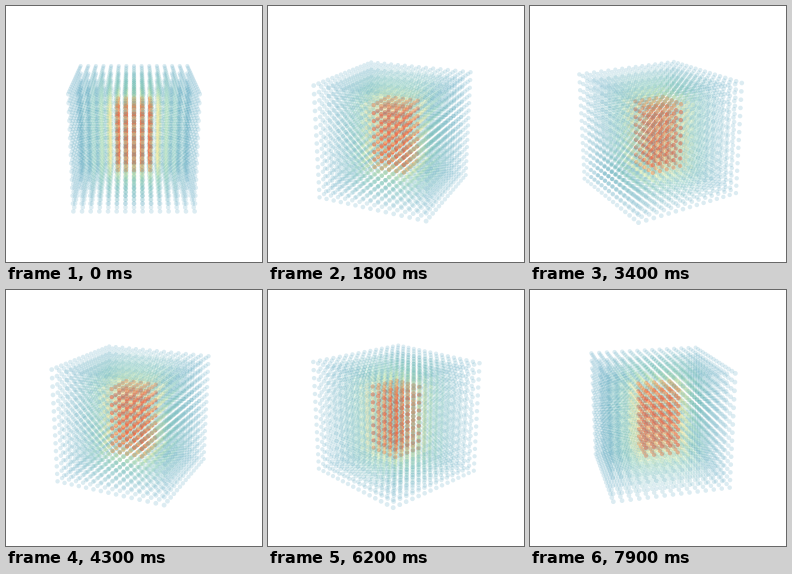
Animation of 256x256 px, one loop 8000 ms. Source, as a matplotlib script:

```python
import numpy as np
import matplotlib.pyplot as plt
from matplotlib.animation import FuncAnimation

SIZE, DPI = 256, 100
FRAMES, INTERVAL = 80, 100
STEP = np.radians(3.6)           # turn per frame
DIST, FOCAL = 9.5, 539           # camera distance and scale in pixels
SIN_E, COS_E = 1 / 3, np.sqrt(8) / 3
PX = 72 / DPI                    # points per pixel

# Cubic lattice with a hot core
axis = np.linspace(-1, 1, 15)
x, y, z = (a.ravel() for a in np.meshgrid(axis, axis, axis))
core = [(x, 0.29), (y, 0.29), (z, 0.51)]
gap = np.sqrt(sum(np.maximum(np.abs(a) - half, 0) ** 2 for a, half in core))
heat = np.exp(-(gap / 0.19) ** 2)
glow = np.exp(-(gap / 0.45) ** 2)
colors = plt.get_cmap("Spectral_r")(0.125 + 0.54 * heat + 0.14 * glow)
colors[:, 3] = 0.18 + 0.47 * heat ** 1.5


def project(angle):
    """Return screen x, screen y and perspective scale of every point."""
    side = x * np.cos(angle) + y * np.sin(angle)
    near = y * np.cos(angle) - x * np.sin(angle)
    scale = FOCAL / (DIST - near * COS_E - z * SIN_E)
    height = z * COS_E - near * SIN_E
    return SIZE / 2 + side * scale, SIZE / 2 + height * scale, scale


fig = plt.figure(figsize=(SIZE / DPI, SIZE / DPI), dpi=DPI, facecolor="white")
ax = fig.add_axes([0, 0, 1, 1])
ax.set(xlim=(0, SIZE), ylim=(0, SIZE))
ax.axis("off")
dots = ax.scatter(x, y, s=8, c=colors, linewidths=0)


def update(frame):
    sx, sy, scale = project(frame * STEP)
    order = np.argsort(scale)
    dots.set_offsets(np.column_stack([sx, sy])[order])
    dots.set_sizes((0.076 * scale[order] * PX) ** 2)
    dots.set_facecolor(colors[order])
    return (dots,)


anim = FuncAnimation(fig, update, frames=FRAMES, interval=INTERVAL,
                     repeat=True, repeat_delay=0, blit=False)
plt.show()
```
